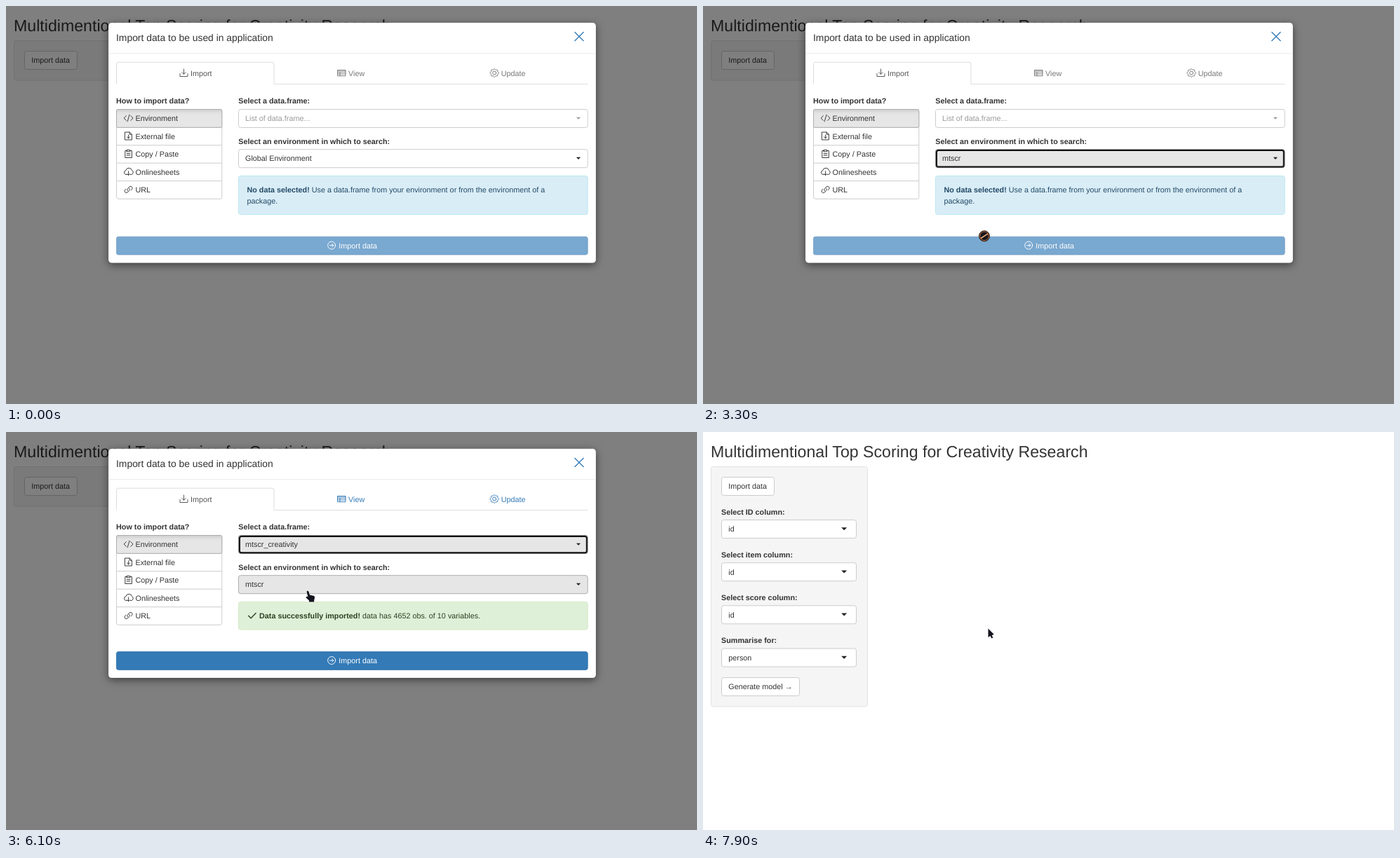
Animation, 985 px wide and 568 px high, one loop 8000 ms. Source, as an HTML page:

```html
<!DOCTYPE html>
<html lang="en">
<head>
<meta charset="utf-8">
<title>Import data dialog</title>
<style>
html, body { margin: 0; width: 100%; height: 100%; overflow: hidden; background: #fff; }
svg { display: block; width: 100vw; height: 100vh; }
text { font-family: "Liberation Sans", Arial, sans-serif; white-space: pre; text-rendering: geometricPrecision; }
.b { font-weight: bold; }
.icon { fill: none; stroke: currentColor; stroke-width: .95; stroke-linecap: round; stroke-linejoin: round; }
.modal { filter: drop-shadow(0 3.9px 5.8px rgba(0,0,0,.5)); }
.menu { filter: drop-shadow(0 4.6px 4.6px rgba(0,0,0,.175)); }
</style>
</head>
<body>
<svg id="stage" viewBox="0 0 985 568"></svg>
<script>
const K = 0.772;      // page zoom
const LOOP = 8000, STEP = 100;
const BLUE = '#337ab7';

// Text placed by its left edge and the middle of its line.
const text = (x, mid, str, { size = 14, fill = '#333', cls = '', id = '', anchor = 'start' } = {}) =>
  `<text x="${x}" y="${mid + size * K * 0.3465}" font-size="${size * K}" fill="${fill}" class="${cls}" id="${id}" text-anchor="${anchor}">${str}</text>`;
const bold = (x, mid, str) => text(x, mid, str, { cls: 'b' });
const rect = (x0, y0, x1, y1, fill, stroke = 'none', extra = 'rx="3"') =>
  `<rect x="${x0}" y="${y0}" width="${x1 - x0}" height="${y1 - y0}" fill="${fill}" stroke="${stroke}" ${extra}/>`;
const line = (d, stroke, w = 1) => `<path d="${d}" fill="none" stroke="${stroke}" stroke-width="${w}"/>`;
const caret = (x, y, r, fill = '#222', id = '') =>
  `<path id="${id}" d="M${x - r} ${y - r / 2}h${2 * r}l${-r} ${r}z" fill="${fill}"/>`;
const icon = (x, y, d) => `<path class="icon" transform="translate(${x} ${y})" d="${d}"/>`;

const gear = Array.from({ length: 49 }, (_, i) => {
  const a = i * Math.PI / 24, r = 5.3 + 0.6 * Math.cos(8 * a);
  return `${i ? 'L' : 'M'}${(r * Math.cos(a) * 1.06).toFixed(2)} ${(r * Math.sin(a)).toFixed(2)}`;
}).join('') + 'M2.5 0A2.5 2.5 0 1 1-2.5 0A2.5 2.5 0 1 1 2.5 0';

const ICONS = {
  code: 'M-3.2-3.4L-6.5 0-3.2 3.4M3.2-3.4L6.5 0 3.2 3.4M1.4-4.8L-1.4 4.8',
  file: 'M-4.8-5.5H1.5L4.8-2.3V5.5H-4.8ZM1.5-5.5V-2.3H4.8M0-1.5V3.3M-2 1.4L0 3.3 2 1.4',
  clip: 'M-2.2-4.5H-4.8V5.5H4.8V-4.5H2.2M-2.2-5.6H2.2V-3.2H-2.2ZM-2.4-.4H2.4M-2.4 2H2.4',
  cloud: 'M-2.2 4H-3.5A2.9 2.9 0 0 1-3.9-1.7A4.6 4.6 0 0 1 5-1.9A3.2 3.2 0 0 1 4.2 4H2.6M0-.6V5M-1.9 3.2L0 5 1.9 3.2',
  link: 'M-1 1.9A2.5 2.5 0 0 1-1-1.6L1.5-4.1A2.5 2.5 0 0 1 5-.6L3.6.8M1-1.9A2.5 2.5 0 0 1 1 1.6L-1.5 4.1A2.5 2.5 0 0 1-5 .6L-3.6-.8',
  tray: 'M-5.5 1V5H5.5V1M0-5.5V1.7M-2.7-.9L0 1.8 2.7-.9',
  table: 'M-5.5-4H5.5V4.2H-5.5ZM-5.5-1.3H5.5M-5.5 1.4H5.5M-2.5-1.3V4.2M-5.5-3.6H5.5',
  go: 'M5.5 0A5.5 5.5 0 1 1-5.5 0A5.5 5.5 0 1 1 5.5 0M-2.7 0H2.6M.5-2.2L2.7 0 .5 2.2',
  check: 'M-5.4.2L-1.9 3.7 5.2-3.6'
};

const tab = (id, x, name, ic, fill) =>
  `<g id="${id}" color="${fill}">${icon(x - 9.5, 95.5, ic)}${text(x, 96.3, name, { fill: 'currentColor' })}</g>`;

const select = (id, top) => `<g id="${id}">
  ${rect(331.5, top, 829.2, top + 26, '#fff', '#ccc', 'rx="3" class="face"')}
  ${rect(333, top + 1.4, 827.8, top + 24.7, 'none', '#101010', 'rx="2.5" stroke-width="2" class="ring"')}
  ${text(341, top + 12.9, '', { cls: 'value' })}
  <g class="arrow">${caret(816, top + 12.7, 3.1, 'currentColor')}</g></g>`;

const field = (mid, label, value) =>
  bold(26, mid - 24.5, label) + rect(26.5, mid - 13, 218.5, mid + 13, '#fff', '#ccc') +
  text(36.3, mid + .2, value) + caret(201.2, mid - .2, 4);

const sources = [['Environment', 'code'], ['External file', 'file'], ['Copy / Paste', 'clip'],
  ['Onlinesheets', 'cloud'], ['URL', 'link']];
const packages = ['mtscr', 'datasets', 'BayesFactor', 'benchmarkme', 'benchmarkmeData', 'bit64', 'carData', 'coda'];

const page = `
  ${rect(0, 0, 985, 568, '#fff', 'none', '')}
  ${text(11, 28.4, 'Multidimentional Top Scoring for Creativity Research', { size: 30 })}
  ${rect(11.5, 49.5, 234.5, 106, '#f5f5f5', '#e3e3e3', 'rx="3" id="well"')}
  ${rect(26.5, 64.5, 101.5, 90.5, '#fff', '#ccc')}${text(36.3, 77.5, 'Import data')}
  <g id="form">
    ${field(138.5, 'Select ID column:', 'id')}${field(199.7, 'Select item column:', 'id')}
    ${field(260.8, 'Select score column:', 'id')}${field(322, 'Summarise for:', 'person')}
    ${rect(26.5, 350.5, 137.5, 376.5, '#fff', '#ccc')}${text(36.3, 363.7, 'Generate model →')}
  </g>
  <g id="bar">${rect(0, 0, 985, 23.2, '#007bc2', 'none', '')}
    ${text(493, 11.8, 'Loading...', { fill: '#fff', cls: 'b', anchor: 'middle' })}</g>
  ${rect(0, 0, 985, 568, '#000', 'none', 'id="shade"')}`;

const sourceList = rect(157.5, 147.5, 307.8, 275.3, '#fff', '#ccc') +
  sources.slice(1).map((_, i) => line(`M157.5 ${173.2 + i * 25.5}h150.3`, '#ccc')).join('') +
  rect(157.5, 147.5, 307.8, 173.3, 'url(#pressed)', '#adadad', 'rx="2"') +
  sources.map(([name, ic], i) =>
    `<g color="#333">${icon(174.6, 160 + i * 25.5, ICONS[ic])}</g>` + text(184.5, 160.3 + i * 25.5, name)).join('');

const envMenu = `<g id="envMenu">
  ${rect(332, 233.3, 828.8, 489, '#fff', '#ccc', 'rx="3" stroke-width=".7" class="menu"')}
  ${rect(338, 239.8, 822.5, 266.2, 'none', '#66afe9', 'rx="3.5" stroke-width="3" opacity=".35"')}
  ${rect(338.5, 240.3, 822, 265.8, '#fff', '#66afe9')}
  ${rect(348, 247, 349, 259, '#333', 'none', 'id="typing"')}
  ${rect(332.4, 269.3, 817, 289.6, BLUE, 'none', '')}${text(347.3, 279.6, 'Global Environment', { fill: '#fff' })}
  ${line('M332.4 296.8H817', '#e5e5e5')}${text(347.3, 312.7, 'Packages', { size: 12, fill: '#777' })}
  ${rect(332.4, 322, 817, 342, '#f5f5f5', 'none', 'id="hot"')}
  ${packages.map((p, i) => text(356.2, 332.2 + i * 20.1, p)).join('')}
  ${rect(817, 269.3, 828.4, 485.5, '#f1f1f1', 'none', '')}
  ${rect(818.4, 280.8, 827, 321.2, '#c1c1c1', 'none', '')}
  <path d="M819.7 277h6l-3-3.3z" fill="#a3a3a3"/><path d="M819.7 477.2h6l-3 3.3z" fill="#505050"/></g>`;

const dataMenu = `<g id="dataMenu">
  ${rect(332, 176.3, 828.8, 204, '#fff', '#ccc', 'rx="3" stroke-width=".7" class="menu"')}
  ${rect(332.4, 180.2, 828.4, 200.2, '#f5f5f5', 'none', '')}
  ${text(347.3, 190.2, 'mtscr_creativity', { fill: '#262626' })}
  ${text(427.8, 190.2, '4652 obs. of 10 variables', { size: 11.9, fill: '#777' })}</g>`;

const modal = `<g id="modal">
  ${rect(145.9, 23.8, 841, 366.7, '#fff', 'rgba(0,0,0,.2)', 'rx="4.6" stroke-width=".8" class="modal" id="panel"')}
  ${text(157, 45, 'Import data to be used in application', { size: 18 })}
  ${line('M810.5 37L823.5 50M823.5 37L810.5 50', BLUE, 1.3)}
  ${line('M146.3 67.7H840.6', '#e5e5e5', .8)}
  ${line('M157.5 111.5V83Q157.5 80.2 160.5 80.2H379Q382 80.2 382 83V111.5H829.3', '#ddd')}
  ${tab('tabImport', 263, 'Import', ICONS.tray, '#555')}
  ${tab('tabView', 488, 'View', ICONS.table, '#777')}
  ${tab('tabUpdate', 705.7, 'Update', gear, '#777')}
  ${bold(157, 135.6, 'How to import data?')}${sourceList}
  ${bold(331.2, 135.6, 'Select a data.frame:')}${bold(331.2, 193, 'Select an environment in which to search:')}
  ${select('dataBox', 147.5)}${select('envBox', 204.7)}
  <g id="info">${rect(331.5, 242.5, 829.2, 297.5, '#d9edf7', '#bce8f1')}
    ${text(343.4, 262.6, '<tspan class="b">No data selected!</tspan> Use a data.frame from your environment or from the environment of a', { fill: '#234a66' })}
    ${text(343.4, 278.2, 'package.', { fill: '#234a66' })}</g>
  <g id="success" color="#2b4222">${rect(331.5, 242.5, 829.2, 282, '#dff0d8', '#d6e9c6')}
    <g stroke-width="1.3">${icon(351, 262, ICONS.check).replace('class="icon"', 'class="icon" style="stroke-width:1.4"')}</g>
    ${text(361, 262.6, '<tspan class="b">Data successfully imported!</tspan> data has 4652 obs. of 10 variables.', { fill: '#2b4222' })}</g>
  <g id="submit" color="#fff">${rect(157.4, 329.2, 829.2, 355, BLUE, '#2e6da4', 'rx="3" stroke-width=".8" id="submitFace"')}
    ${icon(464.2, 341.6, ICONS.go)}${text(474.3, 342.3, 'Import data', { fill: '#fff' })}</g>
  ${envMenu}${dataMenu}</g>`;

const cursors = `<g id="cursor">
  <path id="arrow" d="M0 0V12.5L3 10.4 4.8 14 6.9 13 5.2 9.8 8.2 8.3Z" fill="#15151f" stroke="#fff" stroke-width="1" paint-order="stroke"/>
  <path id="hand" d="M-1.4 1.2C-1.2-.5 1-.6 1.6 1L3 5.4 8.5 6.8Q10.4 7.5 10.1 9.5L9.2 13V15.5H2V13.6L-2.3 9.6Q-2.7 7.5-.6 7.8L.5 8.3Z"
    fill="#15151f" stroke="#fff" stroke-width="1" paint-order="stroke"/>
  <g id="denied" transform="translate(1 0)"><circle r="7.6" fill="#17171f" stroke="#3a2a22" stroke-width=".8"/>
    <circle r="6.3" fill="none" stroke="#c9713a" stroke-width="1"/>
    <path d="M-5 3.2L5-3.2" stroke="#f0b07a" stroke-width="1.5"/></g></g>`;

document.getElementById('stage').innerHTML = `<defs><linearGradient id="pressed" x2="0" y2="1">
  <stop stop-color="#cdcdcd"/><stop offset=".2" stop-color="#e2e2e2"/><stop offset=".35" stop-color="#e6e6e6"/>
  </linearGradient></defs>${page}${modal}${cursors}`;

const $ = id => document.getElementById(id);
const show = (id, on) => { $(id).style.display = on ? '' : 'none'; };
const attr = (el, values) => { for (const k in values) el.setAttribute(k, values[k]); };
const clamp = v => Math.min(1, Math.max(0, v));
const within = (t, a, b) => t >= a && t < b;

// Pointer stops: time, x, y
const PATH = [[300, 520, 45], [500, 472, 150], [700, 438, 258], [800, 434, 252], [1000, 433.2, 220.8],
  [2300, 433.2, 220.8], [3000, 400, 328.3], [3400, 400, 328.3], [4200, 428, 163],
  [4700, 428, 163], [5300, 425, 190], [5900, 425, 190], [6100, 430, 227], [6700, 472.7, 330],
  [7700, 472.7, 330], [7900, 406.5, 280.5]];

function pointerAt(t) {
  let i = PATH.findIndex(p => p[0] > t);
  if (i < 0) i = PATH.length;
  const a = PATH[Math.max(0, i - 1)], b = PATH[i] || a;
  const p = b === a ? 0 : clamp((t - a[0]) / (b[0] - a[0]));
  return [a[1] + (b[1] - a[1]) * p, a[2] + (b[2] - a[2]) * p];
}

function setSelect(id, value, { open, ring, hover, empty }) {
  const box = $(id), part = c => box.querySelector('.' + c);
  attr(part('face'), {
    fill: open ? '#d4d4d4' : ring || hover ? '#e6e6e6' : '#fff',
    stroke: open || ring ? '#8c8c8c' : hover ? '#adadad' : '#ccc'
  });
  part('ring').style.display = ring ? '' : 'none';
  part('value').textContent = value;
  attr(part('value'), { fill: empty ? '#999' : '#333' });
  attr(part('arrow'), { color: empty ? '#999' : '#222' });
}

function draw(ms) {
  const t = Math.floor(ms / STEP) * STEP;
  const [x, y] = pointerAt(t);
  const envOpen = within(t, 1200, 3200), dataOpen = within(t, 4400, 5500);
  const picked = t >= 5500, done = t >= 5600, closing = t >= 7200, ready = t >= 7400;
  const visible = t >= 300;
  const over = (y0, y1) => visible && !ready && x > 331 && x < 829 && y >= y0 && y <= y1;
  const lift = done ? 15.6 : 0;

  const onData = over(147, 174), onEnv = over(204, 231) && !dataOpen;
  const onMenu = envOpen && over(233, 489) || dataOpen && over(176, 204);
  const onSubmit = !envOpen && over(328 - lift, 355 - lift);

  setSelect('dataBox', picked ? 'mtscr_creativity' : 'List of data.frame...',
    { open: dataOpen, ring: within(t, 4400, 7000), hover: onData, empty: !picked });
  setSelect('envBox', t < 3200 ? 'Global Environment' : 'mtscr',
    { open: envOpen, ring: within(t, 3200, 4400), hover: onEnv });

  show('envMenu', envOpen);
  show('typing', within(t, 1300, 1800));
  show('hot', onMenu && y >= 322 && y <= 342);
  show('dataMenu', dataOpen);
  show('info', !done);
  show('success', done);
  attr($('tabView'), { color: done ? BLUE : '#777' });
  attr($('tabUpdate'), { color: done ? BLUE : '#777' });
  attr($('panel'), { height: 342.9 - lift });
  attr($('submit'), { transform: `translate(0 ${-lift})`, opacity: done ? 1 : .65 });
  const pressed = t === 7000 || t === 7100;
  attr($('submitFace'), {
    fill: pressed ? '#204d74' : done && (onSubmit || closing) ? '#286090' : BLUE
  });

  // The dialog fades while it slides up, then the shade clears.
  const gone = t - 7140;
  const slide = 85 * (1 - Math.pow(1 - clamp(gone / 300), 1.66));
  attr($('modal'), { opacity: 1 - clamp(gone / 150), transform: `translate(0 ${-slide})` });
  show('modal', gone < 150);
  attr($('shade'), { opacity: .5 * (1 - clamp((t - 7290) / 150)) });
  show('bar', within(t, 5500, 5700) || within(t, 7200, 7400));
  show('form', ready);
  attr($('well'), { height: ready ? 342.3 : 56.5 });

  const denied = onSubmit && !done;
  const hand = !denied && (onData || onEnv || onMenu || onSubmit);
  show('cursor', visible);
  attr($('cursor'), { transform: `translate(${x} ${y})` });
  show('denied', denied);
  show('hand', hand);
  show('arrow', !denied && !hand);
}

const start = performance.now();
function tick() {
  draw((performance.now() - start) % LOOP);
  requestAnimationFrame(tick);
}
tick();
</script>
</body>
</html>
```
